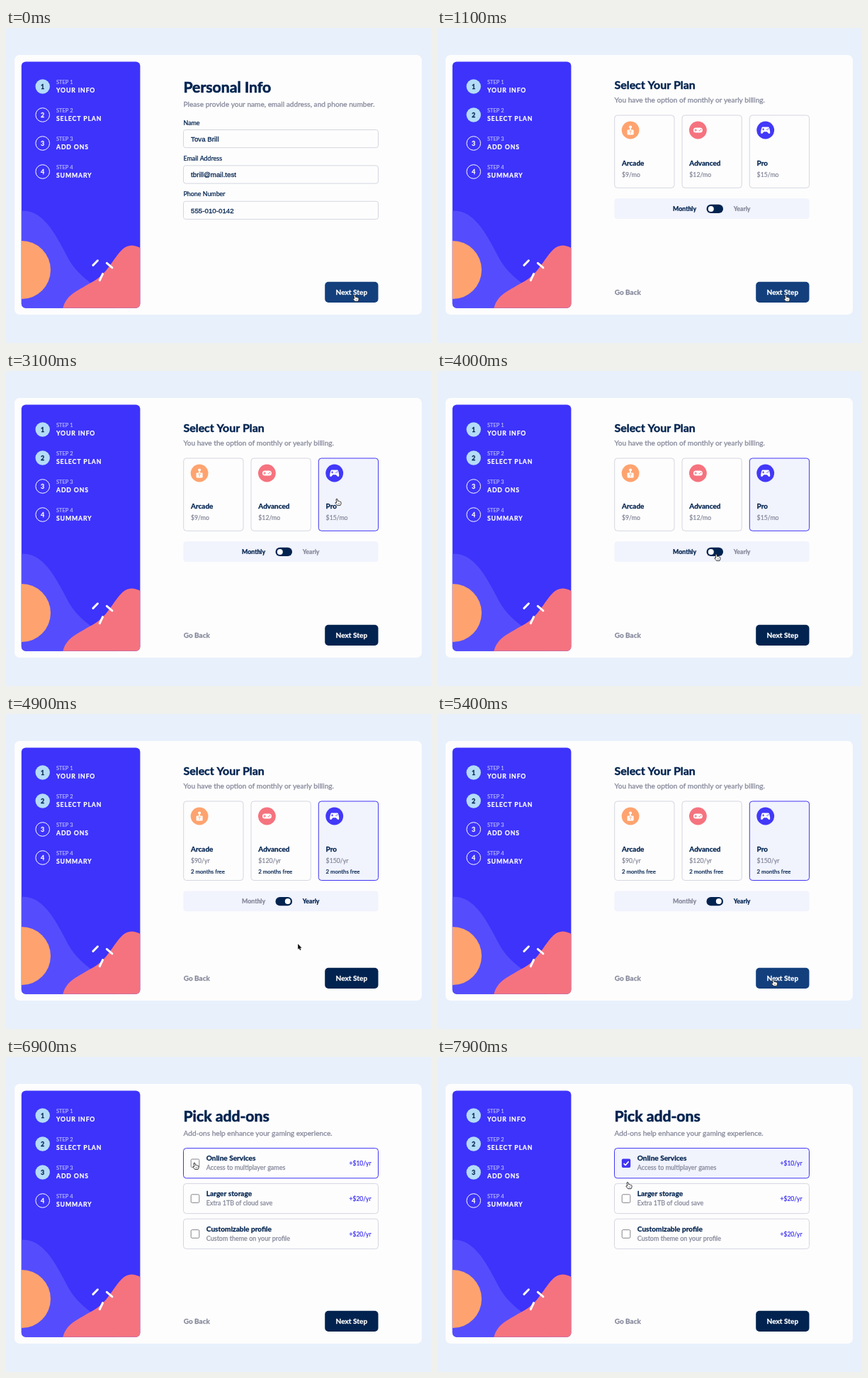
An HTML page with a canvas for the animation above (8 s loop, 600x444 px).

```html
<!DOCTYPE html>
<html lang="en">
<head>
<meta charset="utf-8">
<title>Multi-step form</title>
<style>
  html, body { margin: 0; width: 100%; height: 100%; overflow: hidden; background: #e8f0fc; }
  canvas { display: block; width: 600px; height: 444px; }
</style>
</head>
<body>
<canvas id="stage"></canvas>
<script>
const LOOP = 8000, STEP = 100;
const canvas = document.getElementById('stage');
const ctx = canvas.getContext('2d');
const dpr = window.devicePixelRatio || 1;
canvas.width = 600 * dpr;
canvas.height = 444 * dpr;

const C = {
  navy: '#02234f', hover: '#133f7c', gray: '#85889a', line: '#d5d7e1',
  purple: '#4035f3', pale: '#f1f3fd', white: '#fff', card: '#fdfdfd',
  orange: '#fea36f', pink: '#f5737f', blue: '#b4dcf7'
};

const TIMES = { plan: 600, pro: 2700, yearly: 4200, addons: 5500, online: 7200 };

// Each leg: start, end, from, to, optional control point.
const LEGS = [
  { t0: 1500, t1: 2400, a: [492, 376], b: [467, 180] },
  { t0: 3200, t1: 3800, a: [467, 180], b: [394, 258] },
  { t0: 4500, t1: 5300, a: [394, 258], b: [474.5, 374], c: [390, 332] },
  { t0: 6000, t1: 6900, a: [474.5, 374], b: [266, 149] },
  { t0: 7500, t1: 8200, a: [266, 149], b: [271, 194] }
];

const clamp = v => Math.max(0, Math.min(1, v));
const ease = u => u * u * (3 - 2 * u);

function pointerAt(t) {
  const leg = LEGS.filter(l => t >= l.t0).pop() || LEGS[0];
  const u = ease(clamp((t - leg.t0) / (leg.t1 - leg.t0)));
  return [0, 1].map(i => {
    const mid = leg.c ? leg.c[i] : (leg.a[i] + leg.b[i]) / 2;
    return (1 - u) ** 2 * leg.a[i] + 2 * u * (1 - u) * mid + u * u * leg.b[i];
  });
}

// A hairline outline gives the letters a slightly sturdier stem.
function text(str, x, y, size, color, { weight = 400, align = 'left', spacing = 0, family = 'Lato' } = {}) {
  ctx.font = `${weight} ${size}px ${family}, sans-serif`;
  ctx.textAlign = align;
  ctx.letterSpacing = spacing + 'px';
  ctx.fillStyle = ctx.strokeStyle = color;
  ctx.lineWidth = size * 0.028;
  ctx.lineJoin = 'round';
  ctx.fillText(str, x, y);
  ctx.strokeText(str, x, y);
}

const bold = (str, x, y, size, color, more) => text(str, x, y, size, color, { weight: 700, ...more });

function box(x, y, w, h, r, fill, stroke, width = 1) {
  ctx.beginPath();
  ctx.roundRect(x, y, w, h, r);
  if (fill) { ctx.fillStyle = fill; ctx.fill(); }
  if (stroke) { ctx.strokeStyle = stroke; ctx.lineWidth = width; ctx.stroke(); }
}

function disc(x, y, r, fill, stroke) {
  ctx.beginPath();
  ctx.arc(x, y, r, 0, Math.PI * 2);
  if (fill) { ctx.fillStyle = fill; ctx.fill(); }
  if (stroke) { ctx.strokeStyle = stroke; ctx.lineWidth = 1; ctx.stroke(); }
}

function line(x0, y0, x1, y1, color, width) {
  ctx.beginPath();
  ctx.moveTo(x0, y0);
  ctx.lineTo(x1, y1);
  ctx.strokeStyle = color;
  ctx.lineWidth = width;
  ctx.stroke();
}

function shape(path, fill, stroke, width = 1) {
  const p = new Path2D(path);
  if (fill) { ctx.fillStyle = fill; ctx.fill(p); }
  if (stroke) { ctx.strokeStyle = stroke; ctx.lineWidth = width; ctx.stroke(p); }
}

const inside = ([px, py], x, y, w, h) => px >= x && px <= x + w && py >= y && py <= y + h;

function sidebar(done) {
  ctx.save();
  box(21.8, 47.5, 167.6, 347.2, 6, '#3d33fb');
  ctx.clip();
  shape('M151.5 422 C178 378 111 370 87.4 324 C63.8 278 45.4 249.5 11.2 260 V422Z', '#554dfd');
  disc(22, 341, 41, C.orange);
  shape('M190 310.3 C158.8 293.2 154.9 339.4 124 356.8 C93 374.2 85 378 80 396 H190Z', C.pink);
  ctx.lineCap = 'round';
  line(122.9, 334.4, 129.4, 327.8, C.white, 3);
  line(142.3, 331.4, 149.9, 337.8, C.white, 3);
  line(136.5, 346.6, 132.3, 355.7, C.white, 3);
  ctx.restore();

  ['YOUR INFO', 'SELECT PLAN', 'ADD ONS', 'SUMMARY'].forEach((name, i) => {
    const y = 82.5 + i * 40, on = i < done;
    disc(51.7, y, on ? 10.2 : 9.8, on && C.blue, !on && C.white);
    bold(i + 1, 51.7, y + 3.2, 9, on ? C.navy : C.white, { align: 'center' });
    text('STEP ' + (i + 1), 71, y - 3.7, 7.5, '#b9b8fb');
    bold(name, 71, y + 8.5, 8.7, C.white, { spacing: 0.85 });
  });
}

function heading(title, sub, small) {
  bold(title, 250.5, small ? 85.7 : 90.7, small ? 15.9 : 21.2, C.navy);
  text(sub, 250.5, small ? 105.2 : 111, 10.13, C.gray);
}

function infoPage() {
  heading('Personal Info', 'Please provide your name, email address, and phone number.');
  const fields = [['Name', 'Tova Brill'], ['Email Address', 'tbrill@mail.test'], ['Phone Number', '555-010-0142']];
  fields.forEach(([label, value], i) => {
    const y = 143.5 + i * 50.4;
    text(label, 250.5, y - 7, 8.9, C.navy);
    box(250.5, y, 275, 25.2, 3, C.card, C.line);
    text(value, 261, y + 16.3, 9.75, C.navy, { family: 'Liberation Sans' });
  });
}

function planIcon(i, x, y) {
  const color = [C.orange, C.pink, '#4238f8'][i];
  disc(x, y, 12.4, color);
  if (i === 0) {
    disc(x, y - 4.6, 2, C.white);
    line(x, y - 4, x, y + 1, C.white, 1.6);
    box(x - 4.5, y - 0.5, 9, 7, 1, C.white);
    box(x - 1.6, y + 0.8, 3.2, 1.2, 0.5, color);
    box(x - 0.8, y + 3, 1.6, 1.6, 0.5, color);
  } else if (i === 1) {
    box(x - 6.5, y - 3.6, 13, 7.2, 3.6, C.white);
    line(x - 5, y, x - 1.4, y, color, 1);
    line(x - 3.2, y - 1.8, x - 3.2, y + 1.8, color, 1);
    disc(x + 2, y + 0.6, 0.8, color);
    disc(x + 4.1, y - 0.6, 0.8, color);
  } else {
    ctx.save();
    ctx.translate(x, y);
    shape('M-4.5 -4.5 H4.5 Q6 -3 6.6 3 Q6.6 6 4.2 4.6 L2.2 2.2 H-2.2 L-4.2 4.6 Q-6.6 6 -6.6 3 Q-6 -3 -4.5 -4.5Z', C.white);
    ctx.restore();
    line(x - 4.6, y - 1.2, x - 1.6, y - 1.2, color, 0.9);
    line(x - 3.1, y - 2.7, x - 3.1, y + 0.3, color, 0.9);
    disc(x + 2.3, y - 0.6, 0.7, color);
    disc(x + 3.9, y - 2, 0.7, color);
  }
}

function planPage(t, pointer) {
  const yearly = t >= TIMES.yearly;
  const grow = yearly ? 9.2 : 0;
  let hand = false;
  heading('Select Your Plan', 'You have the option of monthly or yearly billing.', true);

  [['Arcade', 9], ['Advanced', 12], ['Pro', 15]].forEach(([name, price], i) => {
    const x = 250.7 + i * 95.3, h = 102.3 + grow;
    const chosen = i === 2 && t >= TIMES.pro;
    const over = inside(pointer, x, 123, 84.3, h);
    hand ||= over;
    box(x, 123, 84.3, h, 4, chosen ? C.pale : C.card, chosen || over ? C.purple : C.line);
    planIcon(i, x + 22.4, 144);
    bold(name, x + 10.3, 194.2, 10, C.navy);
    text(yearly ? `$${price}0/yr` : `$${price}/mo`, x + 10.3, 209.8, 8.7, C.gray);
    if (yearly) text('2 months free', x + 10.3, 225.3, 7.8, C.navy);
  });

  const y = 240.3 + grow;
  box(250.5, y, 275, 28.8, 4, C.pale);
  bold('Monthly', 333, y + 17.7, 8.8, yearly ? C.gray : C.navy);
  bold('Yearly', 418.7, y + 17.7, 8.7, yearly ? C.navy : C.gray);
  box(380.5, y + 8.5, 23.5, 12.3, 6.15, C.navy);
  disc(386.8 + 11 * ease(clamp((t - TIMES.yearly) / 200)), y + 14.6, 4, C.white);
  return hand || inside(pointer, 380, y + 8, 24, 13);
}

function addonsPage(t, pointer) {
  heading('Pick add-ons', 'Add-ons help enhance your gaming experience.');
  const rows = [
    ['Online Services', 'Access to multiplayer games', 10],
    ['Larger storage', 'Extra 1TB of cloud save', 20],
    ['Customizable profile', 'Custom theme on your profile', 20]
  ];
  rows.forEach(([name, about, price], i) => {
    const y = 128.6 + i * 49.8;
    const checked = i === 0 && t >= TIMES.online;
    const over = inside(pointer, 250.5, y, 275, 42.2);
    box(250.5, y, 275, 42.2, 4, checked ? C.pale : C.card, checked || over ? C.purple : C.line);
    if (checked) {
      box(260.8, y + 15, 12.4, 12.4, 2, C.purple);
      shape(`M263.6 ${y + 21.4} l2.4 2.5 l4.6 -5.2`, null, C.white, 1.7);
    } else {
      box(261.2, y + 15.4, 11.6, 11.6, 1.5, C.white, '#85858c');
    }
    bold(name, 282.8, y + 17.6, 10.1, C.navy);
    text(about, 282.8, y + 30.7, 9, C.gray);
    text(`+$${price}/yr`, 515.6, y + 24.4, 8.5, C.purple, { align: 'right' });
  });
  return inside(pointer, 250.5, 128, 275, 143);
}

function drawPointer([x, y], hand) {
  ctx.save();
  ctx.translate(x, y);
  ctx.lineJoin = 'round';
  if (hand) {
    shape('M-1 .8 Q0 -.6 1 .8 L1.5 3.5 Q2.5 2.8 3 3.8 Q4 3.2 4.5 4.2 Q5.7 3.8 6 5.2 Q6.4 7.6 5 9.4 H.6 Q-.6 7.5 -2.2 6.2 Q-2.4 4.9 -.3 5.6Z', C.white, '#222', 0.9);
    line(2, 6.2, 2, 8, '#333', 0.5);
    line(3.6, 6.2, 3.6, 8, '#333', 0.5);
  } else {
    const arrow = 'M0 0 V7.8 L1.7 6.3 L2.9 9 L4.3 8.4 L3.1 5.8 H5.4Z';
    shape(arrow, null, C.white, 1);
    shape(arrow, '#111');
  }
  ctx.restore();
}

function draw(t) {
  const page = t < TIMES.plan ? 1 : t < TIMES.addons ? 2 : 3;
  const pointer = pointerAt(t);
  ctx.setTransform(dpr, 0, 0, dpr, 0, 0);
  ctx.fillStyle = '#e8f0fc';
  ctx.fillRect(0, 0, 600, 444);
  box(12, 38, 575, 366, 7, C.card);
  sidebar(page);

  let hand = false;
  if (page === 1) infoPage();
  if (page === 2) hand = planPage(t, pointer);
  if (page === 3) hand = addonsPage(t, pointer);

  const button = [450.2, 357.7, 75.3, 29.3];
  const overNext = inside(pointer, ...button);
  if (page > 1) bold('Go Back', 250.7, 376, 10, C.gray);
  box(...button, 5, overNext ? C.hover : C.navy);
  bold('Next Step', 487.9, 376, 10.1, C.white, { align: 'center' });
  drawPointer(pointer, hand || overNext);
}

const start = performance.now();
function frame() {
  const t = (performance.now() - start) % LOOP;
  draw(Math.floor(t / STEP) * STEP);
  requestAnimationFrame(frame);
}
frame();
</script>
</body>
</html>
```
